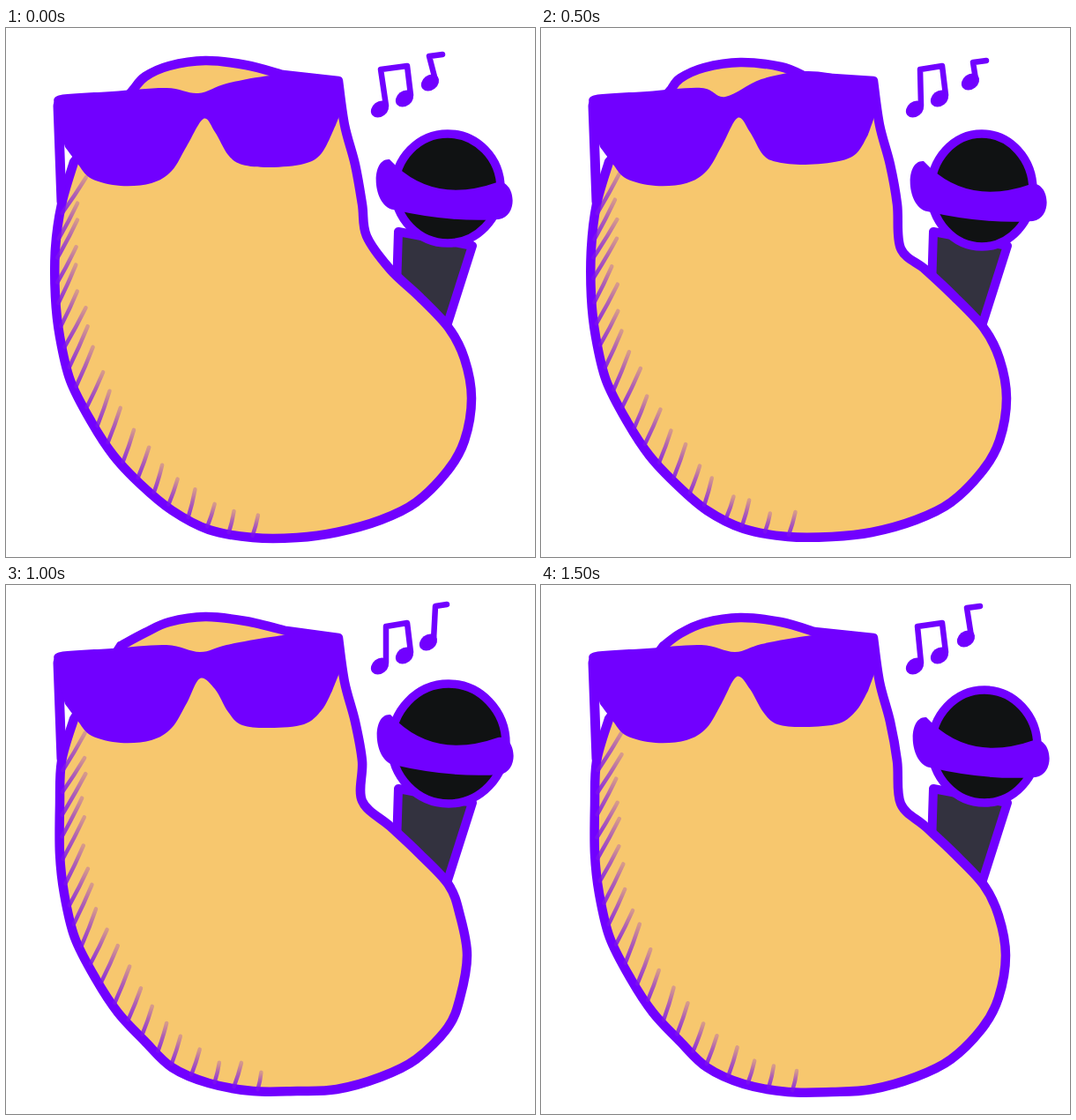
Animation, 600 px wide and 600 px high, one loop 2000 ms. Source, as an HTML page:

```html
<!DOCTYPE html>
<html lang="en">
<head>
<meta charset="utf-8">
<title>Singing bean</title>
<style>
  html, body { margin: 0; width: 100%; height: 100%; overflow: hidden; background: #fff; }
  svg { display: block; width: 100vw; height: 100vh; }
  .pose { visibility: hidden; animation: show 2s step-end infinite; }
  @keyframes show {
    0% { visibility: visible; }
    25%, 100% { visibility: hidden; }
  }
  path { stroke-linecap: round; stroke-linejoin: round; }
  .ink { fill: #7100ff; }
  .line { fill: none; stroke: #7100ff; stroke-width: 6.5; }
  .temple { fill: none; stroke: #7100ff; stroke-width: 11; }
  .body { fill: #f7c76e; stroke: #7100ff; stroke-width: 10.5; }
  .handle { fill: #33323f; stroke: #7100ff; stroke-width: 10; }
  .head { fill: #101213; stroke: #7100ff; stroke-width: 9.5; }
  .hatch { fill: none; stroke: url(#fade); stroke-width: 4.5; }
</style>
</head>
<body>
<svg id="stage" viewBox="0 0 600 600">
  <defs>
    <linearGradient id="fade" x1="0" y1="1" x2="0" y2="0">
      <stop offset="0" stop-color="#7a10f0" stop-opacity=".85"/>
      <stop offset=".55" stop-color="#8a2bd8" stop-opacity=".65"/>
      <stop offset="1" stop-color="#9a45c0" stop-opacity=".35"/>
    </linearGradient>
  </defs>
</svg>
<script>
// Each pose redraws the same figure with a few features moved.
const poses = [
  { left: 0, belly: 578, right: 528, neck: [409, 236], dome: 37, feet: [145, 314],
    bridge: [218, 74], brow: 54, notch: [224, 103], peak: [374, 110], lens: 158,
    mic: [501, 182, 60, 62], stem: 425, note: [481, 62], top: [480, 32], flag: 495 },
  { left: 1, belly: 577, right: 528, neck: [408, 250], dome: 39, feet: [148, 300],
    bridge: [209, 78], brow: 49, notch: [223, 102], peak: [371, 121], lens: 155,
    mic: [500, 184, 58, 64], stem: 430, note: [487, 61], top: [490, 39], flag: 505 },
  { left: 5, belly: 574, right: 523, neck: [404, 245], dome: 36, feet: [130, 318],
    bridge: [220, 76], brow: 59, notch: [220, 106], peak: [370, 120], lens: 162,
    mic: [502, 180, 65, 68], stem: 431, note: [479, 65], top: [487, 24], flag: 500 },
  { left: 5, belly: 575, right: 527, neck: [408, 248], dome: 37, feet: [139, 310],
    bridge: [220, 76], brow: 58, notch: [222, 104], peak: [371, 120], lens: 161,
    mic: [503, 183, 60, 64], stem: 427, note: [482, 61], top: [483, 26], flag: 498 }
];

const bodyOutline = ({ left: l, belly: b, right: r, neck, dome, feet }) =>
  `77,152 63,200 ${56 + l},250 ${56 + l},305 ${61 + l},350 ${73 + l},400 ${97 + l},447 ${122 + l},485
   ${152 + l},517 188,547 230,${b - 9} 280,${b} 330,${b} 375,572 425,558 465,538 501,502
   ${r - 8},468 ${r},420 ${r - 8},375 502,340 468,304 436,274 ${neck} 404,200 396,155 384,110 377,60
   | ${feet[1]},${dome + 16} | 272,${dome + 5} 226,${dome} 185,${dome + 6} 158,${dome + 18} ${feet[0]},69`;

const shadesOutline = ({ bridge, brow, notch, peak, lens }) =>
  `54,85 62,76 120,72 182,68 ${bridge} 250,${brow + 9} 300,${brow} 345,54 378,57
   | 382,90 | ${peak} | 358,142 338,${lens - 4} 300,${lens} 268,${lens - 3} 252,144 237,118
   ${notch} 205,134 188,162 165,176 130,179 97,171 82,155 | 67,135 | 54,85`;

const band = `M444,158Q490,200 558,176C578,172 584,214 560,218
  Q505,222 440,207C416,202 414,148 436,150Z`;

function add(parent, tag, attrs) {
  const el = document.createElementNS('http://www.w3.org/2000/svg', tag);
  for (const key in attrs) el.setAttribute(key, attrs[key]);
  return parent.appendChild(el);
}

// Catmull-Rom runs joined at corners ("|"), written as cubic curves.
function trace(text) {
  const runs = text.split('|').map(run => run.trim().split(/\s+/).map(p => p.split(',').map(Number)));
  let d = 'M' + runs[0][0], last = null;
  for (const run of runs) {
    const pts = last ? [last, ...run] : run;
    for (let i = 0; i < pts.length - 1; i++) {
      const b = pts[i], c = pts[i + 1], a = pts[i - 1] || b, e = pts[i + 2] || c;
      const p = b.map((v, k) => v + (c[k] - a[k]) / 6);
      const q = c.map((v, k) => v - (e[k] - b[k]) / 6);
      d += `C${p} ${q} ${c}`;
    }
    last = pts[pts.length - 1];
  }
  return d + 'Z';
}

function random(seed) {
  return () => (seed = seed * 16807 % 2147483647) / 2147483647;
}

// Strokes along the lower left edge, shorter and steeper towards the belly.
function shade(g, outline, rand) {
  const count = 20;
  for (let k = 0; k < count; k++) {
    const t = k / (count - 1);
    const { x, y } = outline.getPointAtLength(62 + 470 * t + 6 * rand());
    const len = 50 - 28 * t * t + 10 * (rand() - 0.5);
    const lean = (31 - 17 * t + 6 * (rand() - 0.5)) * Math.PI / 180;
    const dx = len * Math.sin(lean), dy = -len * Math.cos(lean);
    add(g, 'path', { class: 'hatch', d: `M${x + 3},${y - 2}q${dx / 2 + 1},${dy / 2} ${dx},${dy}` });
  }
}

poses.forEach((pose, i) => {
  const g = add(document.getElementById('stage'), 'g', { class: 'pose', style: `animation-delay:${i * 0.5 - 2}s` });
  const path = (cls, d) => add(g, 'path', { class: cls, d });
  const [cx, cy, rx, ry] = pose.mic;

  path('handle', 'M445,231L443,295L501,335L529,247Z');
  add(g, 'ellipse', { class: 'head', cx, cy, rx, ry });
  path('ink', band).setAttribute('transform', `translate(${cx - 502} ${cy - 183})`);

  const outline = path('body', trace(bodyOutline(pose)));
  shade(g, outline, random(4321 + 977 * i));
  path('temple', 'M59,88L63,197');
  path('ink', trace(shadesOutline(pose)));

  const [x, y] = pose.note, [tx, ty] = pose.top;
  path('line', `M431,88L${pose.stem},47L455,43L459,76`);
  path('line', `M${x + 6},${y - 3}L${tx},${ty}L${pose.flag},${ty - 2}`);
  for (const [u, v] of [[424, 92], [452, 80], [x, y]]) {
    add(g, 'ellipse', { class: 'ink', cx: u, cy: v, rx: 11, ry: 8.5, transform: `rotate(-38 ${u} ${v})` });
  }
});
</script>
</body>
</html>
```
